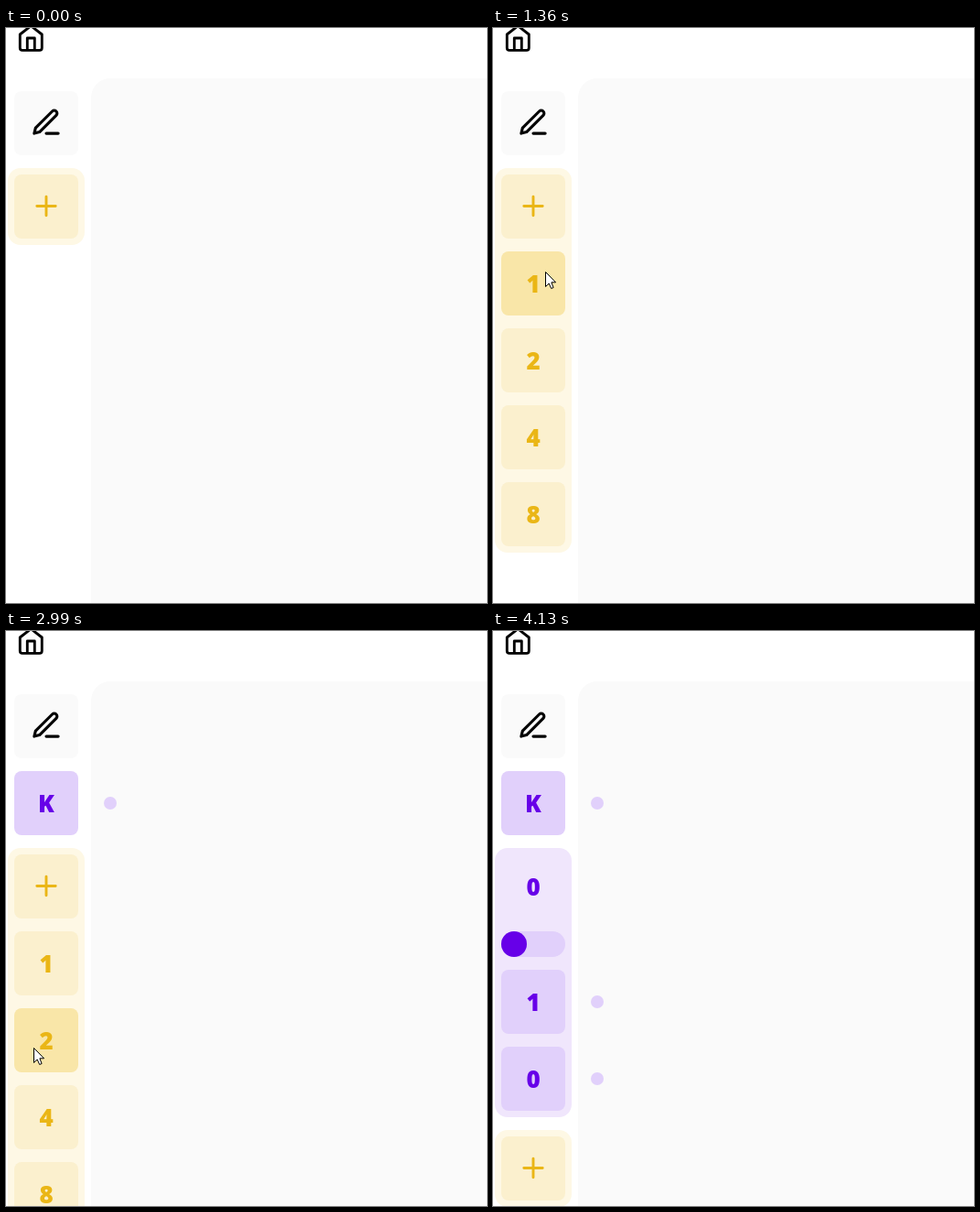
Write an HTML page that moves like this. It is 526 px wide and 628 px high and loops after 4.88 s.

```html
<!DOCTYPE html>
<html lang="en">
<head>
<meta charset="utf-8">
<title>Sidebar menu</title>
<style>
  html, body { margin: 0; width: 100%; height: 100%; overflow: hidden; background: #fff; }
  svg { display: block; }
  text { font: 800 26px "Open Sans", "Noto Sans", sans-serif; text-anchor: middle; }
  .icon { fill: none; stroke: #000; stroke-width: 2.15; stroke-linecap: round; stroke-linejoin: round; }
  .plus { stroke-width: 2; }
</style>
</head>
<body>
<svg width="526" height="628" viewBox="0 0 526 628">
  <rect x="93" y="55" width="460" height="600" rx="21" fill="#fafafa"/>
  <rect x="9" y="69" width="70" height="70" rx="8" fill="#fafafa"/>
  <g class="icon" transform="translate(11.3 -5) scale(1.333)">
    <path d="M3 9l9-7 9 7v11a2 2 0 0 1-2 2H5a2 2 0 0 1-2-2zM9 22V12h6v10"/>
  </g>
  <g class="icon" transform="translate(26.5 85.9) scale(1.458)">
    <path d="M12 20h9M16.5 3.5a2.12 2.12 0 0 1 3 3L7 19l-4 1 1-4z"/>
  </g>
  <g id="menu"></g>
  <path id="cursor" d="M.5.5V16.5L4.2 13 6.7 18.5 9.1 17.5 6.9 11.8H11.6z" fill="#fff" stroke="#000" stroke-linejoin="round"/>
</svg>
<script>
const LOOP = 4880;
const yellow = { panel: '#fef8e5', button: '#fbf0ce', hover: '#f9e6a8', ink: '#eab616' };
const purple = { panel: '#f0e6fc', button: '#e1d0fb', hover: '#ccabf9', ink: '#6700e8' };

// time, layout, menu open, hovered label
const states = [
  [0, 'empty', false, ''],
  [890, 'empty', false, '+'],
  [960, 'empty', true, '+'],
  [1300, 'empty', true, ''],
  [1360, 'empty', true, '1'],
  [1900, 'single', true, '1'],
  [2030, 'single', true, '+'],
  [2710, 'single', true, ''],
  [2780, 'single', true, '1'],
  [2850, 'single', true, ''],
  [2920, 'single', true, '2'],
  [3390, 'group', true, ''],
  [3460, 'group', false, ''],
  [3590, 'group', false, 'bit'],
  [3920, 'group', false, '']
];

// time, x, y of the cursor tip
const track = [
  ...approach(),
  [680, 113, 258], [750, 87, 240], [820, 66, 227], [890, 58, 212], [960, 56, 204],
  [1160, 56, 208], [1230, 56, 222], [1300, 56, 242], [1360, 57, 266], [1430, 58, 284], [1570, 58, 293],
  [2640, 58, 301], [2710, 56, 322], [2780, 51, 362], [2850, 43, 408], [2920, 34, 441], [2990, 30, 455],
  [3920, 92, 480], [3990, 204, 521], [4060, 336, 566]
];

function approach() {
  return Array.from({ length: 8 }, (_, i) => {
    const u = i / 7, eased = u * (1.3 - 0.3 * u);
    return [130 + Math.round(48 * u) * 10, Math.round(452 - 310 * eased), Math.round(612 - 332 * eased)];
  });
}

const rect = (x, y, w, h, r, fill) =>
  `<rect x="${x}" y="${y}" width="${w}" height="${h}" rx="${r}" fill="${fill}"/>`;
const dot = (x, y, r, fill) => `<circle cx="${x}" cy="${y}" r="${r}" fill="${fill}"/>`;
const label = (y, text, fill) => `<text x="44" y="${y + 10}" fill="${fill}">${text}</text>`;
const panel = (y, h, theme) => rect(2, y, 84, h, 14, theme.panel);

function button(y, text, theme, hovered) {
  const glyph = text === '+'
    ? `<path class="icon plus" transform="translate(44 ${y + 34.5}) scale(1.458)" style="stroke:${theme.ink}" d="M-7 0H7M0-7V7"/>`
    : label(y + 35, text, theme.ink);
  return rect(9, y, 70, 70, 8, hovered ? theme.hover : theme.button) + glyph;
}

const port = (y, text, hovered) =>
  button(y, text, purple, hovered) + dot(114, y + 35, 7, purple.button);

function addMenu(y, open, hover) {
  const items = open ? ['+', '1', '2', '4', '8'] : ['+'];
  return panel(y, items.length * 84, yellow) +
    items.map((text, i) => button(y + 7 + i * 84, text, yellow, text === hover)).join('');
}

function group(hover) {
  return panel(237, 294, purple) + label(279, '0', purple.ink) +
    rect(9, 328, 70, 28, 14, purple.button) + dot(23, 342, 14, purple.ink) +
    port(370, '1', false) + port(454, '0', hover === 'bit');
}

function scene([, layout, open, hover]) {
  if (layout === 'empty') return addMenu(153, open, hover);
  const key = port(153, 'K', false);
  return layout === 'single'
    ? key + addMenu(237, open, hover)
    : key + group(hover) + addMenu(545, open, hover);
}

const menu = document.getElementById('menu');
const cursor = document.getElementById('cursor');
const latest = (rows, t) => rows.findLast(row => row[0] <= t);
let shown;

function draw(now) {
  const t = now % LOOP;
  const state = latest(states, t);
  if (state !== shown) menu.innerHTML = scene(shown = state);
  const tip = t < 4130 && latest(track, t);
  cursor.style.display = tip ? '' : 'none';
  if (tip) cursor.setAttribute('transform', `translate(${tip[1]} ${tip[2]})`);
}

function tick() {
  draw(performance.now());
  requestAnimationFrame(tick);
}
tick();
</script>
</body>
</html>
```
